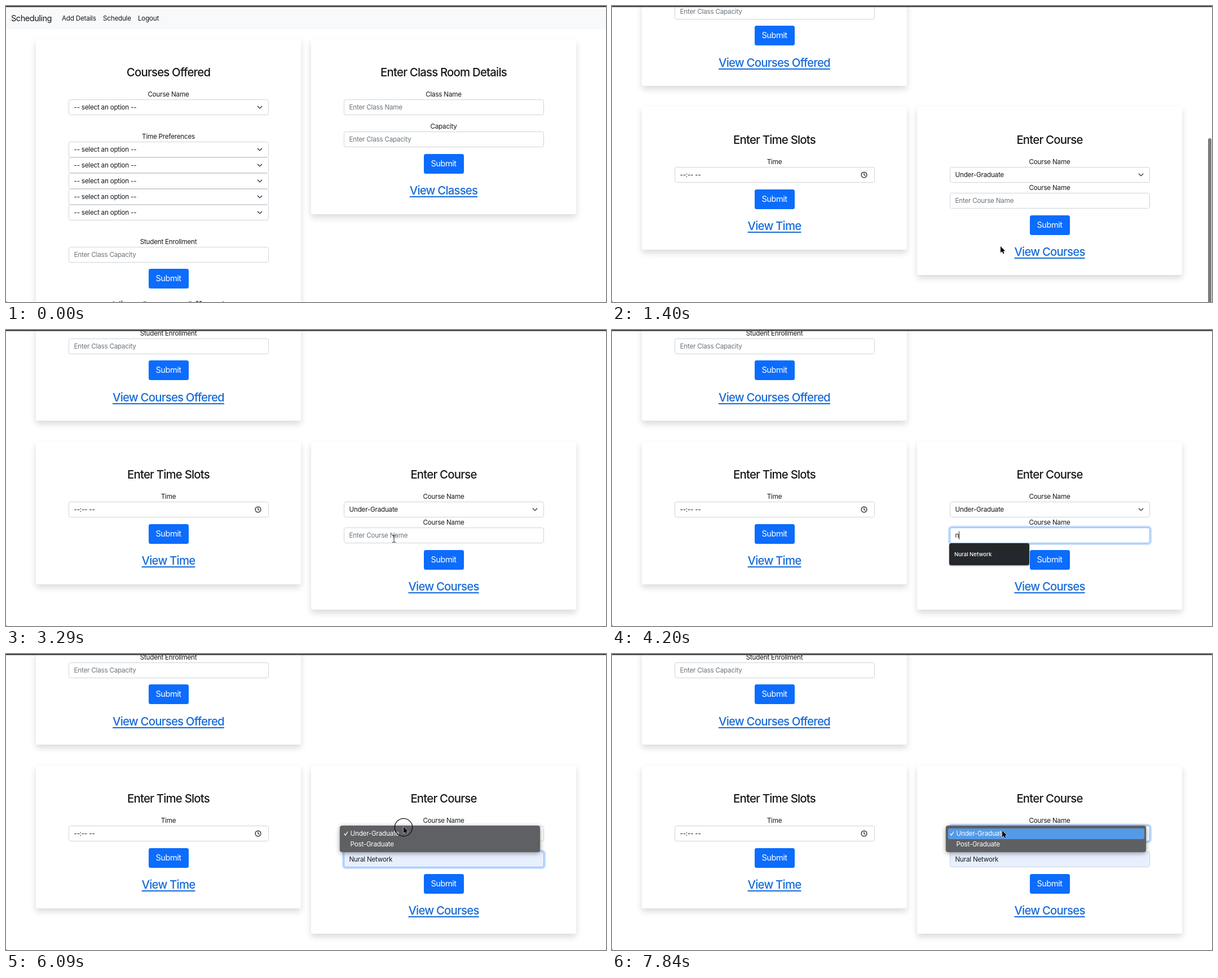
Write an HTML page that moves like this. It is 1064 px wide and 526 px high and loops after 8000 ms.

```html
<!DOCTYPE html>
<html lang="en">
<head>
<meta charset="utf-8">
<title>Scheduling</title>
<style>
  html, body { margin: 0; width: 100%; height: 100%; overflow: hidden; background: #fff; }
  body {
    position: relative; color: #16181b; font: 11.7px/20px Inter, "Open Sans", sans-serif;
    letter-spacing: -.02em; font-optical-sizing: none; white-space: pre;
  }
  body div, body svg { position: absolute; box-sizing: border-box; }
  #page { left: 0; top: 0; width: 1064px; height: 939px; will-change: transform; }
  #nav { left: 0; top: 0; width: 1064px; height: 41px; background: #f8f9fa; }
  #edge { left: 0; top: 0; width: 1064px; height: 1.5px; background: #444; }
  #corner { left: 0; bottom: 0; width: 1px; height: 2px; background: #888; }
  #thumb { left: 1057px; width: 6px; height: 296px; border-radius: 3px; background: #7b7b7b; }
  .card { width: 470px; background: #fff; border-radius: 3px; box-shadow: 0 5.8px 11.7px rgba(0,0,0,.15); }
  .label { width: 354px; text-align: center; }
  .big { font-size: 14.6px; letter-spacing: -.035em; }
  .title, .link { font-size: 20.4px; font-weight: 500; letter-spacing: -.04em; }
  .link { color: #176bd8; text-decoration: underline; text-decoration-thickness: 1.5px; text-underline-offset: 2.5px; }
  .field {
    width: 355px; height: 28px; padding-left: 9px; line-height: 26px;
    background: #fff; border: 1px solid #ced4da; border-radius: 3.5px;
  }
  .hint { color: #6c757d; }
  .button {
    width: 71px; height: 35px; line-height: 35px; text-align: center;
    color: #fff; background: #0b6cfd; border-radius: 3.5px;
  }
  .ring { inset: -1px; border: 1px solid #86b7fe; border-radius: 3.5px; box-shadow: 0 0 0 3px rgba(13,110,253,.25); opacity: 0; }
  .icon { fill: none; stroke: #24282c; stroke-width: 1.3; stroke-linecap: round; stroke-linejoin: round; }
  #caret { display: inline-block; width: 1px; height: 14px; margin-right: -1px; vertical-align: middle; background: #222; }
  #tip {
    left: 598px; top: 792px; width: 142px; height: 39px; padding-left: 9px; color: #fff;
    font: 500 9.6px/39px Inter, sans-serif; letter-spacing: 0;
    background: #24282c; border-radius: 3.5px; box-shadow: 0 1px 3px rgba(0,0,0,.4);
  }
  #menu {
    left: 592px; top: 718px; width: 355px; height: 47px; color: #fff;
    background: #5f6063; border-radius: 4.5px; box-shadow: 0 2px 9px rgba(0,0,0,.4), 0 0 1px rgba(0,0,0,.6);
  }
  .row { left: 4px; width: 348px; height: 19px; padding-left: 14.5px; line-height: 19px; border-radius: 3px; }
  .row.on { background: #549ae9; }
  #pointer { left: 0; top: 0; overflow: visible; }
</style>
</head>
<body>
<div id="page"><div id="nav"></div></div>
<div id="edge"></div>
<div id="corner"></div>
<div id="thumb"></div>
<svg id="pointer" width="1" height="1">
  <circle id="halo" cy="1" r="15.7" fill="none" stroke="#111" stroke-width="1.3"/>
  <path id="arrow" d="M0 0V11.6L2.7 9.1 4.6 13.3 6.5 12.5 4.7 8.4H8.3Z" fill="#000" stroke="#fff" stroke-width="1" paint-order="stroke"/>
  <path id="beam" d="M-3 -6.5Q0 -6.5 0 -5V5Q0 6.5 -3 6.5M3 -6.5Q0 -6.5 0 -5M0 5Q0 6.5 3 6.5" fill="none" stroke="#222"/>
</svg>
<script>
const $ = id => document.getElementById(id);
const page = $('page');
const LEFT = 111, RIGHT = 599;

function add(cls, x, y, html = '', parent = page) {
  const el = document.createElement('div');
  el.className = cls;
  el.style.left = x + 'px';
  el.style.top = y + 'px';
  el.innerHTML = html;
  parent.append(el);
  return el;
}

const icon = (x, y, shape) =>
  `<svg class="icon" style="left:${x}px;top:${y}px" width="14" height="14">${shape}</svg>`;
const chevron = icon(331, 6, '<path d="M3.3 5.2L7 8.9 10.7 5.2"/>');
const clock = icon(328.5, 6, '<circle cx="7" cy="7" r="4.9"/><path d="M7 4V7.2L9 8.3"/>');

// All y values below are vertical centres in page coordinates.
function card(x, top, bottom) {
  add('card', x - 58, top).style.height = bottom - top + 'px';
}
const text = (x, y, s, cls = '') => add('label ' + cls, x, y - 10, s);
const field = (x, y, html) => add('field', x - .5, y - 14, html);
const hint = s => `<span class="hint">${s}</span>`;
const select = (x, y, s = '-- select an option --') => field(x, y, s + chevron);
function submit(x, y, link) {
  add('button big', x + 141.5, y - 17.5, 'Submit');
  text(x, y + 48, link, 'link');
}

add('big', 9, 12, 'Scheduling');
add('', 99, 12, 'Add Details');
add('', 172, 12, 'Schedule');
add('', 234, 12, 'Logout');

card(LEFT, 58.5, 574);
card(RIGHT, 58.5, 369.5);
card(LEFT, 610.5, 864.5);
card(RIGHT, 610.5, 910);

text(LEFT, 117.5, 'Courses Offered', 'title');
text(LEFT, 157, 'Course Name');
select(LEFT, 180);
text(LEFT, 231.5, 'Time Preferences');
for (let i = 0; i < 5; i++) select(LEFT, 254.5 + 28 * i);
text(LEFT, 418.5, 'Student Enrollment');
field(LEFT, 441.5, hint('Enter Class Capacity'));
submit(LEFT, 484.5, 'View Courses Offered');

text(RIGHT, 117.5, 'Enter Class Room Details', 'title');
text(RIGHT, 157, 'Class Name');
field(RIGHT, 180, hint('Enter Class Name'));
text(RIGHT, 214, 'Capacity');
field(RIGHT, 237, hint('Enter Class Capacity'));
submit(RIGHT, 280, 'View Classes');

text(LEFT, 669.5, 'Enter Time Slots', 'title');
text(LEFT, 709, 'Time');
field(LEFT, 731.5, '--:-- --' + clock);
submit(LEFT, 775, 'View Time');

text(RIGHT, 669.5, 'Enter Course', 'title');
const level = select(RIGHT, 731.5, 'Under-Graduate');
const course = field(RIGHT, 777.5,
  '<span id="value"></span><span id="caret"></span><span class="hint" id="hint">Enter Course Name</span>');
text(RIGHT, 709, 'Course Name');
text(RIGHT, 755, 'Course Name');
submit(RIGHT, 821, 'View Courses');
const levelRing = add('ring', 0, 0, '', level);
const courseRing = add('ring', 0, 0, '', course);
for (const ring of [levelRing, courseRing]) ring.style.left = ring.style.top = '-1px';

page.insertAdjacentHTML('beforeend', `<div id="tip">Nural Network</div><div id="menu">
<div class="row" style="top:4.5px">Under-Graduate</div><div class="row" style="top:23.5px">Post-Graduate</div>
<svg class="icon" style="left:6px;top:9px;stroke:#fff" width="10" height="10"><path d="M2 5.5L4 8 7.8 2"/></svg></div>`);
const rows = document.querySelectorAll('.row');

const scroll = [[910, 0], [980, 22], [1050, 105], [1120, 217], [1190, 312], [1260, 380], [1330, 419],
  [1400, 432], [1470, 430], [1540, 425], [1610, 419], [1680, 415], [1750, 413]];
const thumbFade = [[910, 0], [980, 1], [1750, 1], [1890, .52], [2030, 0]];
const courseFocus = [[3430, 0], [3570, 1], [6090, 1], [6230, 0]];
const levelFocus = [[6090, 0], [6230, 1]];
const path = [[70, 88, 22], [350, 776, 330], [630, 776, 330], [770, 640, 447], [910, 640, 447],
  [1120, 680, 442], [1400, 689, 427], [1750, 690, 426], [1890, 697, 343], [2100, 688, 370],
  [2870, 688, 370], [2940, 688, 371], [4830, 688, 371], [4970, 682, 392], [5110, 674, 407],
  [5460, 674, 407], [5670, 701, 308], [5810, 705, 307], [6300, 705, 307], [6440, 700, 336],
  [6580, 696, 362], [6650, 696, 362], [6860, 696, 335], [7000, 696, 335], [7140, 692, 314]];

// Linear interpolation of column c between [time, ...values] keys.
function at(keys, t, c = 1) {
  const i = keys.findIndex(k => k[0] > t);
  if (i < 0) return keys[keys.length - 1][c];
  if (i === 0) return keys[0][c];
  const a = keys[i - 1], b = keys[i];
  return a[c] + (b[c] - a[c]) * (t - a[0]) / (b[0] - a[0]);
}
const within = (t, ...spans) => spans.some(([a, b]) => t >= a && t < b);
const show = (el, on) => { el.style.visibility = on ? 'visible' : 'hidden'; };

function draw(t) {
  const y = at(scroll, t);
  page.style.transform = `translateY(${-Math.round(y)}px)`;
  $('thumb').style.top = 3 + Math.min(y, 413) * .561 + 'px';
  $('thumb').style.opacity = at(thumbFade, t);

  const typed = t < 4200 ? '' : t < 4410 ? 'n' : t < 5040 ? 'nu' : 'Nural Network';
  $('value').textContent = typed;
  $('hint').textContent = typed ? '' : 'Enter Course Name';
  show($('caret'), within(t, [3500, 3990], [4200, 4900]));
  course.style.background = t < 5040 ? '#fff' : '#e8f0fe';
  courseRing.style.opacity = at(courseFocus, t);
  levelRing.style.opacity = at(levelFocus, t);
  show($('tip'), within(t, [4200, 5250]));

  show($('menu'), t >= 5880);
  rows[0].classList.toggle('on', within(t, [6370, 6440], [7070, 7490], [7560, 8000]));
  rows[1].classList.toggle('on', within(t, [6440, 6580], [6720, 7070]));

  const beam = within(t, [2030, 4900]);
  const seen = t >= 70 && !within(t, [4200, 4830]);
  $('pointer').style.transform = `translate(${at(path, t, 1)}px,${at(path, t, 2)}px)`;
  show($('arrow'), seen && !beam);
  show($('beam'), seen && beam);
  show($('halo'), within(t, [3430, 3570], [5180, 5320], [5670, 6160], [7280, 7490]));
}

const start = performance.now();
function tick() {
  const t = (performance.now() - start) % 8000;
  draw(Math.min(7840, Math.floor(t / 70) * 70));
  requestAnimationFrame(tick);
}
tick();
</script>
</body>
</html>
```
